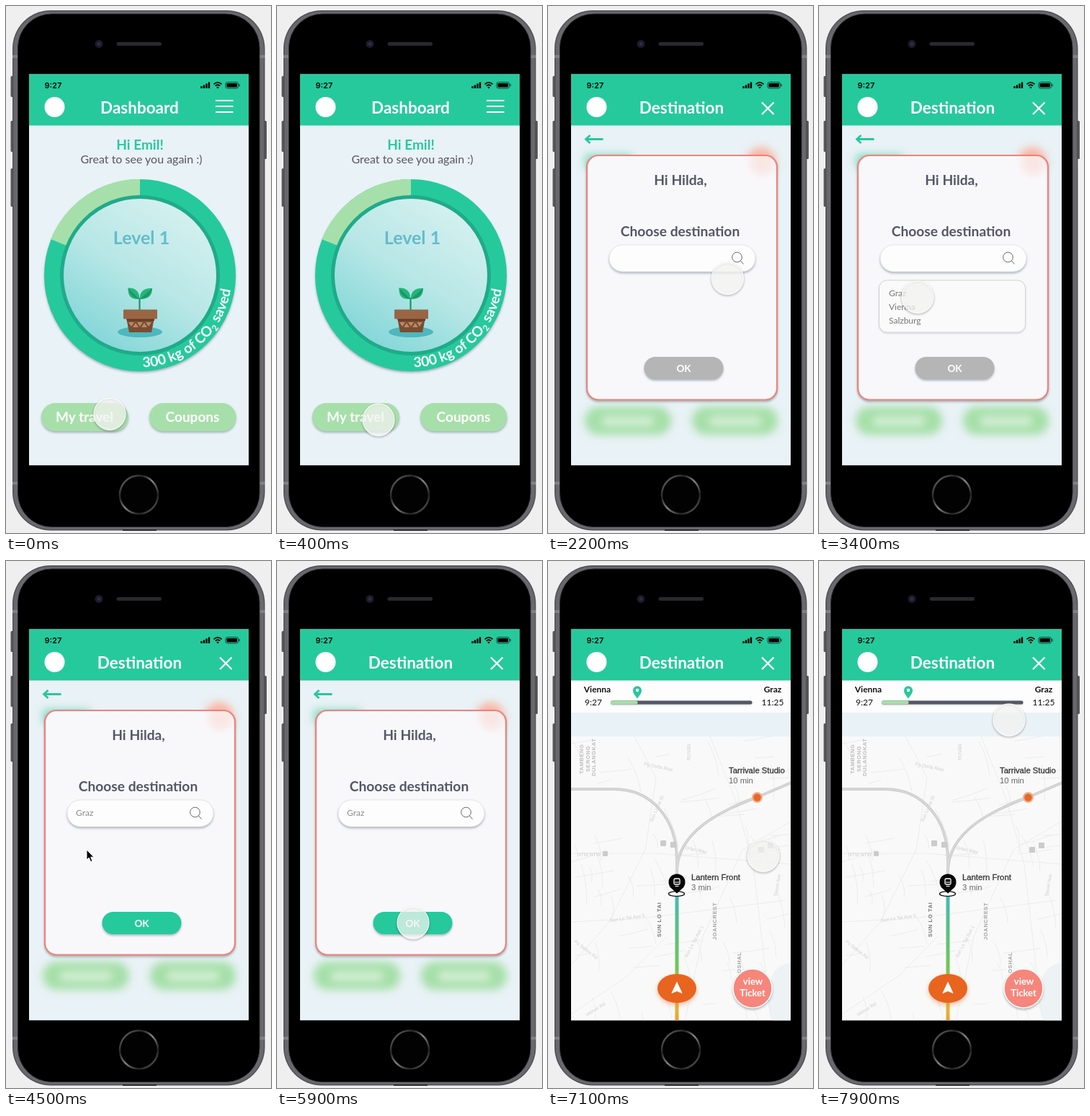
An HTML page for the animation above (8 s loop, 368 by 730 pixels).

```html
<!DOCTYPE html>
<html lang="en">
<head>
<meta charset="utf-8">
<title>Travel app</title>
<style>
  html, body { margin: 0; width: 100%; height: 100%; overflow: hidden; background: #efeff0; }
  svg { display: block; width: 368px; height: 730px; font-family: Lato, sans-serif; }
  .b { font-weight: 700; }
  .mid { text-anchor: middle; }
  .ink { fill: #555666; }
  .sans { font-family: "Liberation Sans", Arial, sans-serif; }
  .soft { filter: drop-shadow(0 2px 1.5px rgba(40, 70, 80, .36)); }
  .faint { filter: drop-shadow(0 1px 1px rgba(0, 0, 0, .16)); }
  .glow { filter: drop-shadow(0 3px 3px rgba(232, 100, 31, .4)); }
</style>
</head>
<body>
<svg viewBox="0 0 368 730" xmlns="http://www.w3.org/2000/svg">
  <defs>
    <linearGradient id="home" x1="0" y1="0" x2="1" y2="1">
      <stop offset="0" stop-color="#777"/><stop offset=".3" stop-color="#262626"/>
      <stop offset=".5" stop-color="#858585"/><stop offset=".75" stop-color="#222"/>
      <stop offset="1" stop-color="#777"/>
    </linearGradient>
    <linearGradient id="dial" x1=".8" y1=".1" x2=".25" y2=".95">
      <stop offset="0" stop-color="#d3f0ef"/><stop offset=".5" stop-color="#b7e7e6"/>
      <stop offset="1" stop-color="#84d6d8"/>
    </linearGradient>
    <linearGradient id="line" gradientUnits="userSpaceOnUse" x1="0" y1="455" x2="0" y2="636">
      <stop offset="0" stop-color="#45b9c0"/><stop offset=".3" stop-color="#58bf86"/>
      <stop offset=".6" stop-color="#74c655"/><stop offset=".85" stop-color="#d9c23e"/>
      <stop offset="1" stop-color="#f0a030"/>
    </linearGradient>
    <filter id="blur" x="-50%" y="-50%" width="200%" height="200%"><feGaussianBlur stdDeviation="6"/></filter>
    <filter id="haze" x="-20%" y="-20%" width="140%" height="140%"><feGaussianBlur stdDeviation="1.2"/></filter>
    <clipPath id="screen"><rect x="32" y="94.5" width="305" height="541.8"/></clipPath>
    <clipPath id="mapArea"><rect x="32" y="243" width="306" height="394"/></clipPath>
    <clipPath id="inCard"><rect x="55" y="208" width="262" height="336.500" rx="15"/></clipPath>
    <path id="arc" d="M186 500.5A127.5 127.5 0 0 0 313.5 373"/>
    <g id="rings" filter="url(#blur)">
      <circle cx="187" cy="380" r="122" fill="none" stroke="#26c99c" stroke-width="24"/>
      <rect x="168" y="402" width="36" height="15" fill="#70d0a8"/>
      <rect x="168" y="430" width="38" height="30" fill="#f4765b"/>
    </g>
  </defs>

  <!-- phone -->
  <rect width="368" height="730" fill="#efeff0"/>
  <g fill="#56565a">
    <rect x="6.5" y="97" width="5" height="29" rx="1.5"/>
    <rect x="6.5" y="159" width="5" height="43" rx="1.5"/>
    <rect x="6.5" y="225" width="5" height="53" rx="1.5"/>
    <rect x="357" y="159" width="5" height="53" rx="1.5"/>
  </g>
  <rect x="9" y="6" width="350.5" height="720.5" rx="53" fill="#505054"/>
  <rect x="10.500" y="7.500" width="347.500" height="717.500" rx="51.500" fill="#69696d"/>
  <path d="M9 70h8M351 70h8M9 661h8M351 661h8" stroke="#818185" stroke-width="4"/>
  <rect x="16.500" y="11" width="335.500" height="710.500" rx="47" fill="#000" stroke="#27272a"/>
  <path d="M162 726h47" stroke="#2b2b2e" stroke-width="2"/>
  <circle cx="129" cy="52.500" r="5.500" fill="#1b1b27"/>
  <circle cx="129" cy="52.500" r="2.500" fill="#2c2c4c"/>
  <rect x="153.500" y="50" width="62.500" height="5" rx="2.500" fill="#29292c"/>
  <circle cx="184.500" cy="677" r="26.500" fill="#020202" stroke="url(#home)" stroke-width="2.500"/>

  <g clip-path="url(#screen)">
    <rect x="32" y="94" width="306" height="543" fill="#e9f2f6"/>

    <g id="dash">
      <text class="b mid" x="186" y="199" font-size="19" fill="#26c99c">Hi Emil!</text>
      <text class="mid" x="188" y="218" font-size="16" fill="#55565f">Great to see you again :)</text>
      <g class="soft">
        <circle cx="186" cy="373" r="120" fill="none" stroke="#26c99c" stroke-width="26"/>
        <path d="M74.700 328A120 120 0 0 1 186 253" fill="none" stroke="#a7dfaa" stroke-width="26"/>
      </g>
      <circle cx="186" cy="373" r="108.500" fill="url(#dial)" stroke="#1fab8a" stroke-width="5"/>
      <text class="b mid" x="188" y="330" font-size="25" fill="#65bccb">Level 1</text>
      <ellipse cx="186" cy="451.500" rx="31" ry="7.500" fill="#4fb7bd"/>
      <path d="M185.500 421V404" stroke="#1c9469" stroke-width="2.200"/>
      <path d="M185 406C173 407 169 401 169.500 390.500C180 390 186 396 185 406Z" fill="#24b578"/>
      <path d="M186 406C199 406 203 400 203 391C192 390 185 396 186 406Z" fill="#24b578"/>
      <path d="M185 406L169.500 390.500Q173 404 185 406ZM186 406L203 391Q200 405 186 406Z" fill="#1a966b"/>
      <path d="M167 432H206L202 452H171Z" fill="#7b4d30"/>
      <path d="M167 432H206V436H168Z" fill="#633c25"/>
      <rect x="163" y="420.500" width="47" height="13" rx="1" fill="#9a6543"/>
      <path d="M170 438h8l-4 6zM182 438h8l-4 6zM194 438h8l-4 6zM176 445l4-6 4 6zM188 445l4-6 4 6z" fill="#b98a69"/>
      <text class="b" font-size="19.500" fill="#fff"><textPath href="#arc" startOffset="4">300 kg of CO<tspan font-size="12" dy="4">2</tspan><tspan dy="-4"> saved</tspan></textPath></text>
      <g class="soft" fill="#a7dfaa">
        <rect x="49" y="550" width="121" height="39" rx="19.500"/>
        <rect x="199" y="550" width="120.500" height="39" rx="19.500"/>
      </g>
      <g class="b mid" font-size="19" fill="#fff">
        <text x="109" y="576">My travel</text><text x="259" y="576">Coupons</text>
      </g>
    </g>

    <g id="choose">
      <g filter="url(#blur)">
        <rect x="51" y="555" width="120" height="39" rx="19" fill="#a5dfa8"/>
        <rect x="200" y="555" width="119" height="39" rx="19" fill="#a5dfa8"/>
        <path d="M76 575H146M225 575H295" stroke="#fff" stroke-width="12" opacity=".55"/>
        <rect x="52" y="206" width="64" height="18" fill="#79d9bd"/>
        <circle cx="296" cy="216" r="20" fill="#ffa184" opacity=".75"/>
      </g>
      <use id="ghost" href="#rings"/>
      <path d="M76.500 184.500H53M58.500 179L52.500 184.500L58.500 190" fill="none" stroke="#26c99c" stroke-width="2.800"/>
      <rect class="soft" x="54" y="207" width="264" height="338.500" rx="16" fill="#f8f8fb" stroke="#f1817a" stroke-width="2.200"/>
      <g clip-path="url(#inCard)">
        <use id="veil" href="#rings"/>
        <circle cx="298" cy="217" r="17" fill="#ffa184" opacity=".2" filter="url(#blur)"/>
      </g>
      <g class="b mid ink" font-size="19.200">
        <text x="184" y="248">Hi Hilda,</text><text x="183.500" y="318.500">Choose destination</text>
      </g>
      <rect class="soft" x="85" y="331" width="203" height="37" rx="18.500" fill="#fdfdfd" stroke="#e1e1e1" stroke-width=".8"/>
      <g fill="none" stroke="#666670">
        <circle cx="262.500" cy="348" r="6.800"/><path d="M267.300 352.800L271.500 357.500"/>
      </g>
      <text id="picked" x="97" y="353" font-size="12" fill="#8b8b8b">Graz</text>
      <g id="list">
        <rect class="faint" x="83.500" y="380" width="203" height="72" rx="11" fill="#fafafb" stroke="#d5d5d5"/>
        <g font-size="12" fill="#777">
          <text x="97" y="402">Graz</text><text x="97" y="421">Vienna</text><text x="97" y="440">Salzburg</text>
        </g>
      </g>
      <rect id="ok" class="soft" x="133.500" y="486" width="110" height="31" rx="15.500"/>
      <text class="b mid" x="188.500" y="506.500" font-size="13.500" fill="#fff">OK</text>
    </g>

    <g id="map">
      <rect x="32" y="165" width="306" height="45" fill="#fdfdfd"/>
      <g class="mid" font-size="12" fill="#111">
        <text class="b" x="68.500" y="182">Vienna</text><text x="63" y="200">9:27</text>
        <text class="b" x="312" y="182">Graz</text><text x="312" y="200">11:25</text>
      </g>
      <g stroke-width="5" stroke-linecap="round" class="faint">
        <path d="M89.500 196H281" stroke="#555666"/><path d="M89.500 196H122" stroke="#a7dfaa"/>
      </g>
      <path d="M124 190.500C120.500 185.500 118 183 118 179.200A6 6 0 0 1 130 179.200C130 183 127.500 185.500 124 190.500Z" fill="#26c99c"/>
      <circle cx="124" cy="179" r="2.200" fill="#fff"/>
      <g clip-path="url(#mapArea)">
        <rect x="32" y="243" width="306" height="394" fill="#f9f9f9"/>
        <path d="M338 556Q309 560 308 591Q300 612 313 637H338Z" fill="#edf2f5"/>
        <path id="roads" fill="none" stroke="#ececec"/>
        <g fill="none" stroke="#cfcfcf" stroke-width="4">
          <path id="west" d="M32 316H92C142 316 179 355 179 415V446"/>
          <path id="east" d="M338 307L291 327C236 347 181 376 179 428"/>
        </g>
        <g fill="none" stroke="#dedede"><use href="#west"/><use href="#east"/></g>
        <g id="labels" class="sans"></g>
        <g fill="#cbcbcb">
          <rect x="156" y="387" width="8" height="8" rx="1"/><rect x="170" y="389" width="8" height="8" rx="1"/>
          <rect x="292" y="396" width="8" height="8" rx="1"/><rect x="305" y="390" width="8" height="8" rx="1"/>
          <rect x="76" y="402" width="7" height="7" rx="1"/>
        </g>
        <path d="M179 459V637" stroke="url(#line)" stroke-width="5"/>
        <circle cx="290.500" cy="327.500" r="7.500" fill="#efb08c"/><circle cx="290.500" cy="327.500" r="5.200" fill="#e8672a"/>
        <ellipse cx="178.500" cy="461" rx="11" ry="3.400" fill="#fff" stroke="#111" stroke-width="1.400"/>
        <path d="M179 460.500L172 454A11.500 11.500 0 1 1 186 454Z" fill="#050505"/>
        <rect x="175" y="440" width="8" height="8" rx="1.500" fill="none" stroke="#fff" stroke-width="1.300"/>
        <path d="M176 445h6M176.500 450.500h5" stroke="#fff"/>
        <g class="sans" font-size="11.300">
          <g fill="#333" stroke="#333" stroke-width=".3">
            <text x="251" y="294">Tarrivale Studio</text><text x="199" y="442">Lantern Front</text>
          </g>
          <g fill="#666"><text x="251" y="307.500">10 min</text><text x="199" y="456">3 min</text></g>
        </g>
        <ellipse class="glow" cx="179" cy="592" rx="27" ry="20" fill="#e8641f"/>
        <path d="M179 583.500L186 598.500L179 595.500L172 598.500Z" fill="#fff" stroke="#fff" stroke-linejoin="round"/>
        <circle class="soft" cx="284" cy="592" r="27" fill="#f6867c" stroke="#fff" stroke-width="1.500"/>
        <g class="b mid" font-size="13" fill="#fff"><text x="284.500" y="587">view</text><text x="284" y="603">Ticket</text></g>
      </g>
    </g>

    <!-- header -->
    <rect x="32" y="94" width="306" height="71.500" fill="#26c99c"/>
    <text x="53.500" y="114" font-size="11" font-weight="600" style="font-family:Inter,sans-serif">9:27</text>
    <path d="M271.500 114v-3M275 114v-4.500M278.500 114v-6.500M282 114v-8.500" stroke="#000" stroke-width="2.400"/>
    <path d="M288.500 108.300Q294 103.500 299.500 108.300M290.700 110.700Q294 107.800 297.300 110.700" fill="none" stroke="#000" stroke-width="1.700"/>
    <path d="M292.200 112.400Q294 111 295.800 112.400L294 114.400Z"/>
    <rect x="305" y="105.500" width="17.500" height="8.500" rx="2.500" fill="none" stroke="#0c4535"/>
    <rect x="306.500" y="107" width="14.500" height="5.500" rx="1.200"/><rect x="323.500" y="108" width="1.200" height="3.500" fill="#0c4535"/>
    <circle cx="67.500" cy="140" r="14" fill="#fff"/>
    <text id="title" class="b mid" x="185.500" y="149.300" font-size="22.500" fill="#fff"></text>
    <path id="menu" d="M291 131H315.500M291 139H315.500M291 147H315.500" stroke="#fff" stroke-width="1.800"/>
    <path id="close" d="M297 133.500L313.500 150M313.500 133.500L297 150" stroke="#fff" stroke-width="2.300"/>
  </g>

  <g id="touch">
    <circle cy="1.500" r="22.300" fill="none" stroke="#000" stroke-opacity=".24" stroke-width="2" filter="url(#haze)"/>
    <circle r="22" fill="#f3f3f1" fill-opacity=".74" stroke="#fff" stroke-opacity=".85" stroke-width="1.300"/>
  </g>
  <path id="pointer" d="M0 0V14L3.200 11L5.600 16.500L8 15.500L5.700 10.200H10Z" stroke="#fff"/>
</svg>
<script>
const $ = id => document.getElementById(id);
const show = (id, on) => $(id).setAttribute("display", on ? "inline" : "none");
const LOOP = 8000, STEP = 100;

// time, x, y of the cursor
const path = [
  [100, 144, 565], [400, 141, 573], [1500, 141, 573], [2400, 265, 349],
  [3000, 265, 349], [3400, 137, 403], [3900, 113, 404], [4700, 113, 404],
  [5500, 189, 501], [6700, 189, 501], [7100, 299, 408], [7600, 299, 400], [7900, 264, 220]
];
// the system pointer replaces the touch dot until the next move
const pointerTimes = [[900, 1600], [2700, 3100], [4500, 4800], [6000, 6800]];

const ease = k => k * k * (3 - 2 * k);

function cursorAt(t) {
  if (t <= path[0][0]) return path[0].slice(1);
  for (let i = 1; i < path.length; i++) {
    const [t0, x0, y0] = path[i - 1], [t1, x1, y1] = path[i];
    if (t <= t1) {
      const k = ease((t - t0) / (t1 - t0));
      return [x0 + (x1 - x0) * k, y0 + (y1 - y0) * k];
    }
  }
  return path[path.length - 1].slice(1);
}

const label = (size, fill, weight) => ([s, x, y, a]) =>
  `<text transform="translate(${x} ${y}) rotate(${a})" font-size="${size}" fill="${fill}" font-weight="${weight}"${weight > 400 ? ' letter-spacing=".6"' : ""}>${s}</text>`;

// text, x, y, angle
const districts = [["TAMBENG", 49, 295, -90], ["SERONG", 57.5, 292, -90], ["DULANGKAT", 66, 298, -90]];
const nearby = [["JOANCREST", 234, 525, -90], ["OSHAL", 268, 571, -90]];
const streetNames = [
  ["RUVAN", 198, 276, -90], ["NTW NTW", 41, 409, 0], ["Pg Dorla Rise", 133, 283, 12],
  ["Sun Lo Tai Ave 5", 86, 500, -8], ["Sun Lo Tai Ave 1", 193, 550, -62],
  ["Sun Lo Tai St", 145, 362, -66], ["Po Selma Rd", 36, 528, 38], ["Velmor Rd", 54, 631, -32],
  ["Orlan Way", 190, 399, 12], ["Tessel Ave", 318, 465, -80]
];
$("labels").innerHTML = [
  ...districts.map(label(7.5, "#bdbdbd", 700)),
  ...nearby.map(label(7.6, "#a5a5a5", 700)),
  label(7.6, "#777", 700)(["SUN LO TAI", 157, 521, -90]),
  ...streetNames.map(label(6.6, "#cecece", 400))
].join("");

// faint side streets from a seeded generator
let seed = 11;
const rand = () => (seed = seed * 16807 % 2147483647) / 2147483647;
let streets = "M32 405H150L338 420M120 243L150 300L135 400L85 500L32 560M32 628L110 575L165 520" +
  "M338 360L270 400L215 520L190 637M32 500L130 495L330 470M225 243L260 330L285 420L310 637";
for (let i = 0; i < 80; i++) {
  const x = 32 + rand() * 300, y = 245 + rand() * 385;
  const a = (rand() < .5 ? -.35 : 1.2) + rand() * .3, len = 18 + rand() * 40;
  const dx = len * Math.cos(a), dy = len * Math.sin(a);
  streets += `M${x} ${y}q${dx / 2 + 5} ${dy / 2} ${dx} ${dy}`;
}
$("roads").setAttribute("d", streets);

function draw(t) {
  const chosen = t >= 4500;
  const dash = t < 900, map = t >= 6000;
  show("dash", dash);
  show("choose", !dash && !map);
  show("map", map);
  show("menu", dash);
  show("close", !dash);
  show("list", t >= 2700 && !chosen);
  show("picked", chosen);
  $("title").textContent = dash ? "Dashboard" : "Destination";
  $("ok").setAttribute("fill", chosen ? "#26c99c" : "#b5b5b6");

  // the old screen lingers behind and faintly through the card
  const rest = Math.max(0, Math.min(1, (1300 - t) / 400));
  $("ghost").setAttribute("opacity", rest * .8);
  $("veil").setAttribute("opacity", rest * .09);

  const [x, y] = cursorAt(t);
  const arrow = pointerTimes.some(([a, b]) => t >= a && t < b);
  show("pointer", arrow);
  show("touch", !arrow);
  $("touch").setAttribute("transform", `translate(${x} ${y})`);
  $("pointer").setAttribute("transform", `translate(${x - 1} ${y - 4})`);
}

const start = performance.now();
function tick() {
  const t = (performance.now() - start) % LOOP;
  draw(Math.floor(t / STEP) * STEP);
  requestAnimationFrame(tick);
}
tick();
</script>
</body>
</html>
```
